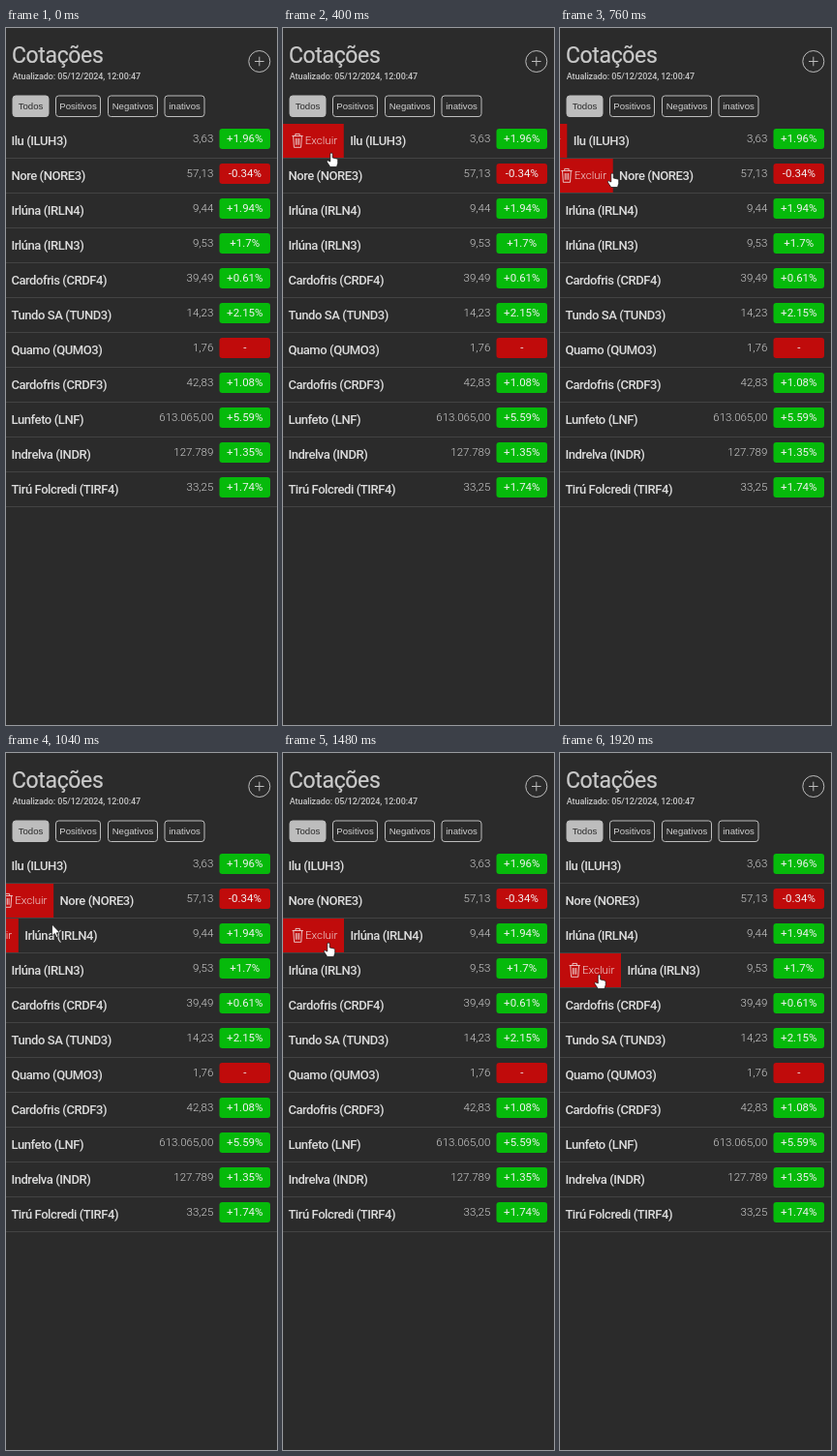
Recreate the animation shown at these times as an HTML page. Size 280x720 px, loop 1.96 s.

```html
<!DOCTYPE html>
<html lang="pt-BR">
<head>
<meta charset="utf-8">
<title>Cotações</title>
<style>
  html, body { margin: 0; width: 100%; height: 100%; overflow: hidden; background: #2b2b2b; }
  svg { display: block; width: 280px; height: 720px; font-family: Roboto, sans-serif; }
  .title { font-size: 23px; letter-spacing: -.36px; fill: #cacaca; stroke: #cacaca; stroke-width: .2px; }
  .stamp { font-size: 9px; font-weight: 500; letter-spacing: -.1px; fill: #c6c6c6; }
  .tab { font: 9.6px "Liberation Sans", Arial, sans-serif; text-anchor: middle; fill: #d0d0d0; }
  .tab.on { fill: #2b2b2b; }
  .name { font-size: 13px; font-weight: 500; letter-spacing: -.42px; fill: #dcdcdc; }
  .price { font-size: 11.5px; font-weight: 300; text-anchor: end; fill: #cfcfcf; }
  .change { font-size: 11.5px; text-anchor: middle; fill: #f0f0f0; }
  .remove { font-size: 11.5px; font-weight: 300; fill: #eed4d4; }
  .icon { fill: none; stroke: #eed4d4; stroke-width: .9; }
  .cursor path { fill: #fff; stroke: #111; stroke-width: .7; stroke-linejoin: round; }
</style>
</head>
<body>
<svg id="stage" viewBox="0 0 280 720"></svg>
<script>
const LOOP = 1960, STEP = 40, SLIDE = 340;
const TOP = 99, PITCH = 36, SHIFT = 64;
const GREEN = '#06ba0b', RED = '#c00b0b', LINE = '#bdbdbd';

const quotes = [
  ['Ilu (ILUH3)', '3,63', '+1.96%'],
  ['Nore (NORE3)', '57,13', '-0.34%'],
  ['Irlúna (IRLN4)', '9,44', '+1.94%'],
  ['Irlúna (IRLN3)', '9,53', '+1.7%'],
  ['Cardofris (CRDF4)', '39,49', '+0.61%'],
  ['Tundo SA (TUND3)', '14,23', '+2.15%'],
  ['Quamo (QUMO3)', '1,76', '-'],
  ['Cardofris (CRDF3)', '42,83', '+1.08%'],
  ['Lunfeto (LNF)', '613.065,00', '+5.59%'],
  ['Indrelva (INDR)', '127.789', '+1.35%'],
  ['Tirú Folcredi (TIRF4)', '33,25', '+1.74%'],
];
const tabs = [['Todos', 7, 37], ['Positivos', 51.5, 46], ['Negativos', 105.5, 51], ['inativos', 164, 41]];

// Moments when the pointer enters each of the first rows
const enters = [86, 563, 984, 1570];

// Pointer path: time, x, y
const path = [
  [40, -20, 104], [86, 2, 112], [200, 48.5, 125], [400, 50, 129], [563, 50, 135],
  [600, 50, 138], [760, 54, 150], [900, 52, 160], [984, 49, 171], [1040, 47.5, 177],
  [1250, 47, 188], [1480, 47, 196], [1570, 46, 207], [1740, 42, 222], [1920, 40.5, 229],
];

const stage = document.getElementById('stage');

function add(parent, tag, attrs, text) {
  const node = document.createElementNS('http://www.w3.org/2000/svg', tag);
  for (const key in attrs) node.setAttribute(key, attrs[key]);
  if (text) node.textContent = text;
  return parent.appendChild(node);
}
const label = (parent, cls, x, y, text) => add(parent, 'text', { class: cls, x, y }, text);

label(stage, 'title', 6, 35.8, 'Cotações');
label(stage, 'stamp', 6.8, 52.6, 'Atualizado: 05/12/2024, 12:00:47');
add(stage, 'circle', { cx: 261.8, cy: 34.5, r: 11, fill: 'none', stroke: LINE });
add(stage, 'path', { d: 'M257 34.5h9.6M261.8 29.7v9.6', stroke: LINE });

tabs.forEach(([text, x, width], i) => {
  add(stage, 'rect', { x, y: 70, width, height: 21.5, rx: 3, fill: i ? 'none' : '#bdbdbd', stroke: LINE });
  label(stage, i ? 'tab' : 'tab on', x + width / 2, 84, text);
});

const sliders = quotes.map(([name, price, change], i) => {
  const row = add(stage, 'g', { transform: `translate(0 ${TOP + i * PITCH})` });
  add(row, 'rect', { y: 35, width: 280, height: 1, fill: '#434343' });
  label(row, 'price', 214.3, 19.4, price);
  add(row, 'rect', { x: 220.5, y: 5, width: 52.5, height: 21, rx: 3, fill: change[0] === '-' ? RED : GREEN });
  label(row, 'change', 246.8, 19.4, change);

  const slider = add(row, 'g', {});
  label(slider, 'name', 5.4, 21.6, name);
  if (i < enters.length) {
    const panel = add(slider, 'g', { transform: `translate(${-SHIFT} 0)` });
    add(panel, 'rect', { width: 63, height: 35, fill: RED });
    add(panel, 'path', {
      class: 'icon',
      d: 'M9.6 12.5H20.8M13 12.5V10.4H17.4V12.5M10.8 12.5L11.6 24.3H18.8L19.6 12.5M13.5 15V21.8M15.2 15V21.8M16.9 15V21.8'
    });
    label(panel, 'remove', 23, 21.4, 'Excluir');
  }
  return slider;
});

const cursor = add(stage, 'g', { class: 'cursor' });
const arrow = add(cursor, 'path', { d: 'M0 0V12L2.8 9.4 4.6 13.6 6.4 12.8 4.7 8.8H8.4Z' });
const hand = add(cursor, 'path', {
  d: 'M-1.2 1.2q0-1.2 1.2-1.2t1.2 1.2V5L5.5 6q1.2.4 1.2 1.6V10.5L5.5 14.5H-1.2L-4.5 9.5q-.6-1.4.6-1.7L-1.2 9Z'
});

// cubic-bezier(.25, .1, .25, 1)
function ease(x) {
  if (x <= 0) return 0;
  if (x >= 1) return 1;
  const curve = (u, a, b) => 3 * a * u * (1 - u) ** 2 + 3 * b * u * u * (1 - u) + u ** 3;
  let lo = 0, hi = 1;
  for (let i = 0; i < 24; i++) {
    const mid = (lo + hi) / 2;
    if (curve(mid, .25, .25) < x) lo = mid; else hi = mid;
  }
  return curve(lo, .1, 1);
}

function offset(i, t) {
  if (!(i in enters)) return 0;
  const leave = enters[i + 1] ?? LOOP;
  return SHIFT * (ease((t - enters[i]) / SLIDE) - ease((t - leave) / SLIDE));
}

function pointer(t) {
  const k = Math.max(1, path.findIndex(p => p[0] >= t));
  const [t0, x0, y0] = path[k - 1], [t1, x1, y1] = path[k];
  const f = (t - t0) / (t1 - t0);
  return [x0 + (x1 - x0) * f, y0 + (y1 - y0) * f];
}

function draw(t) {
  enters.forEach((_, i) => sliders[i].setAttribute('transform', `translate(${offset(i, t).toFixed(2)} 0)`));
  const [x, y] = pointer(t);
  const over = Math.floor((y - TOP) / PITCH);
  const pressable = x <= offset(over, t) + .5;
  cursor.setAttribute('transform', `translate(${x.toFixed(2)} ${y.toFixed(2)})`);
  cursor.style.display = t < STEP ? 'none' : '';
  arrow.style.display = pressable ? 'none' : '';
  hand.style.display = pressable ? '' : 'none';
}

const start = performance.now();
function tick() {
  const t = (performance.now() - start + 2) % LOOP;
  draw(Math.floor(t / STEP) * STEP);
  requestAnimationFrame(tick);
}
draw(0);
requestAnimationFrame(tick);
</script>
</body>
</html>
```
